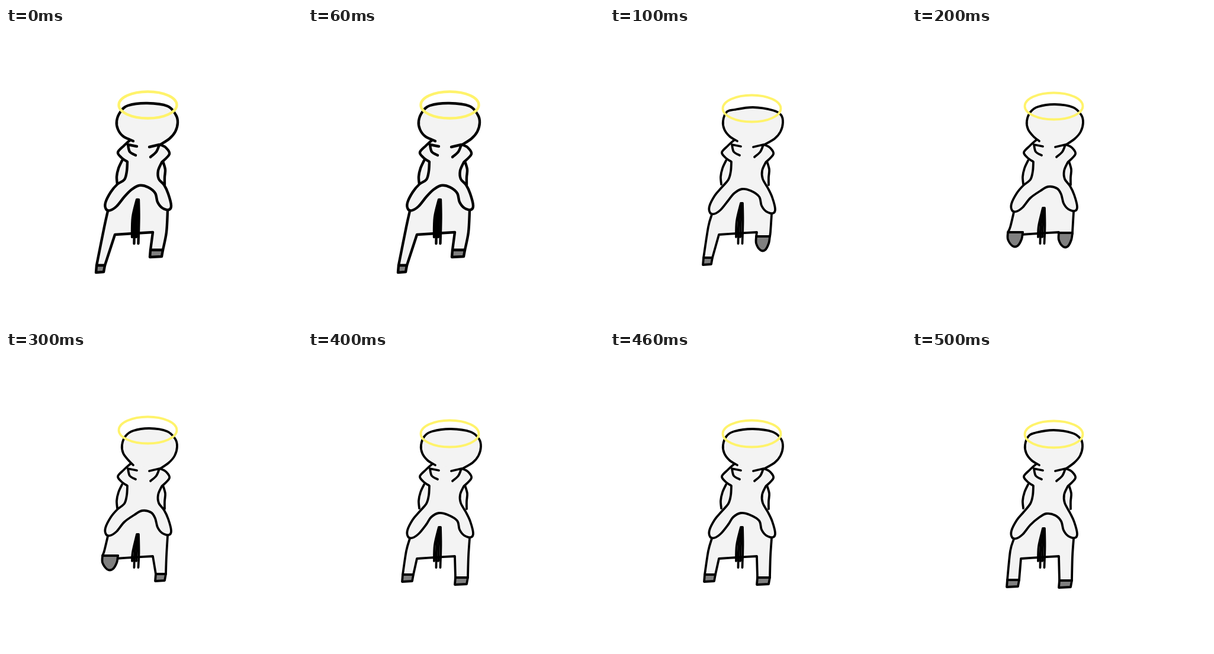
These frames come from a looping animation (500x500 px, 600 ms). An HTML page with a canvas:

```html
<!DOCTYPE html>
<html lang="en">
<head>
<meta charset="utf-8">
<title>Trotting pony with a halo</title>
<style>
  html, body { margin: 0; width: 100%; height: 100%; overflow: hidden; background: #fff; }
  canvas { display: block; }
</style>
</head>
<body>
<canvas id="stage" width="500" height="500"></canvas>
<script>
const STEP = 100;
const INK = '#000', COAT = '#f3f3f3', HOOF = '#808080', GOLD = '#fff36b';
const ctx = document.getElementById('stage').getContext('2d');
ctx.lineCap = ctx.lineJoin = 'round';

// halo: centre y; head: left, right, top; sag: drop of the hips; peak: x of the arch
// between the thighs; tail: y of its root; left, right: hoof x, y and width.
const poses = [
  { halo: 130, head: [187, 290, 127], sag: -2, peak: 225, tail: 290, left: [153, 401, 14], right: [244, 375, 21], line: 4.4 },
  { halo: 136, head: [191, 292, 134], sag: 4, peak: 223, tail: 296, left: [158, 388, 15], right: [247, 352, 23] },
  { halo: 132, head: [194, 289, 129], sag: 0, peak: 230, tail: 304, left: [162, 345, 25], right: [248, 346, 23] },
  { halo: 132, head: [196, 289, 129], sag: 0, peak: 230, tail: 308, left: [163, 344, 26], right: [253, 375, 17] },
  { halo: 138, head: [191, 292, 130], sag: 4, peak: 221, tail: 296, left: [160, 376, 18], right: [249, 381, 21] },
  { halo: 139, head: [191, 288, 132], sag: 5, peak: 227, tail: 298, left: [161, 385, 20], right: [249, 386, 21] }
];

// Catmull-Rom curve through 'x,y' points; '|' makes a sharp corner.
function curve(stroke) {
  let d = '', last = [];
  for (const run of stroke.split('|')) {
    const pts = [...last, ...run.trim().split(/\s+/).map(p => p.split(',').map(Number))];
    if (!d) d = 'M' + pts[0];
    for (let i = 0; i < pts.length - 1; i++) {
      const b = pts[i], c = pts[i + 1], a = pts[i - 1] || b, e = pts[i + 2] || c;
      const c1 = b.map((v, k) => v + (c[k] - a[k]) / 6);
      const c2 = c.map((v, k) => v - (e[k] - b[k]) / 6);
      d += `C${c1} ${c2} ${c}`;
    }
    last = [pts.at(-1)];
  }
  return d;
}

// `under` extends the fill behind parts painted later.
function paint(stroke, fill, under = '') {
  const d = curve(stroke);
  if (fill) {
    ctx.fillStyle = fill;
    ctx.fill(new Path2D(d + under));
  }
  ctx.stroke(new Path2D(d));
}

const lower = (stroke, dy) => stroke.replace(/,(\d+)/g, (_, y) => ',' + (+y + dy));

function drawSides() {
  const under = 'L230 262L230 225';
  paint('196,224 190,237 187,251 188,264', COAT, under);
  paint('265,225 269,239 268,252 268,265', COAT, under);
}

function drawRump({ sag, left: [lx, ly, lw], right: [rx, ry, rw] }) {
  paint(`172,${311 + sag} 166,336 ${lx},${ly} | ${lx + lw},${ly} | 184,349 | 215,347 248,345 |
    ${rx},${ry} | ${rx + rw},${ry} | 271,345 273,${311 + sag}`, COAT, 'L248 270L195 270');
}

// A raised hoof shows its long round sole.
function drawHoof([x, y, w]) {
  const sole = y < 360
    ? `${x + w - 2},${y + 12} ${x + w * .65},${y + 23} ${x + w * .3},${y + 23} ${x},${y + 12}`
    : `${x + w - 2},${y + 11} | ${x - 1},${y + 12} |`;
  paint(`${x},${y} | ${x + w},${y} | ${sole} ${x},${y}`, HOOF);
}

function drawTail(root) {
  for (let i = 0; i < 4; i++) {
    const tip = 213 + i * 3.5;
    paint(`${221 + i},${root} ${tip + 1},${root + 30} ${tip},${i % 2 ? 364 : 353}`);
  }
}

function drawBody({ sag, peak }) {
  const hips = lower(`188,266 177,279 168,297 169,308 176,310 187,303 200,287 ${peak - 13},275
    ${peak},268 ${peak + 15},271 252,281 256,296 264,306 275,309 279,302 274,282 267,267`, sag);
  paint(`210,189 199,199 189,210 195,219 205,226 | 204,242 200,256 ${hips}
    258,255 257,241 263,227 | 276,213 270,202 260,197`, COAT);
}

function drawHead([left, right, top]) {
  paint(`215,191 ${left + 11},183 ${left + 2},171 ${left},157 ${left + 6},142 ${left + 19},${top + 4}
    ${(left + right) / 2},${top} ${right - 17},${top + 5} ${right - 3},147 ${right},160
    ${right - 4},175 ${right - 14},187 259,198`, COAT);
}

function drawCollar() {
  paint('221,200 206,197 | 209,209 219,215');
  paint('242,201 259,197 | 254,209 244,218');
}

function drawHalo(y) {
  ctx.strokeStyle = GOLD;
  ctx.beginPath();
  ctx.ellipse(239.5, y, 49, 22.5, 0, 0, 2 * Math.PI);
  ctx.stroke();
}

function draw(pose) {
  ctx.fillStyle = '#fff';
  ctx.fillRect(0, 0, 500, 500);
  ctx.strokeStyle = INK;
  ctx.lineWidth = pose.line || 3.8;
  drawSides();
  drawRump(pose);
  drawHoof(pose.left);
  drawHoof(pose.right);
  drawTail(pose.tail);
  drawBody(pose);
  drawHead(pose.head);
  drawCollar();
  drawHalo(pose.halo);
}

function tick() {
  draw(poses[Math.floor(performance.now() / STEP) % poses.length]);
  requestAnimationFrame(tick);
}
tick();
</script>
</body>
</html>
```
